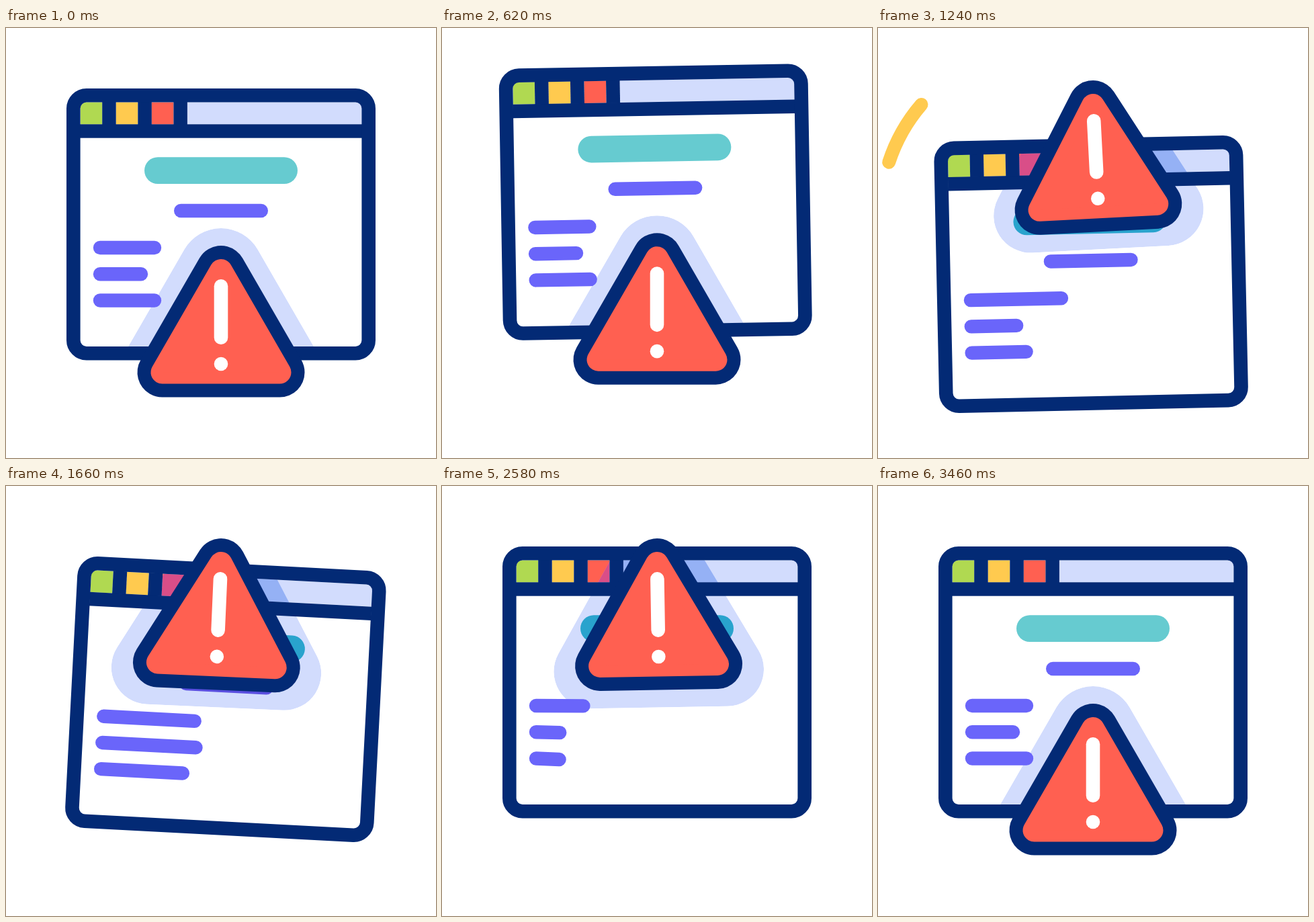
An HTML page with a canvas for the animation above (3.6 s loop, 640x640 px).

```html
<!DOCTYPE html>
<html lang="en">
<head>
<meta charset="utf-8">
<title>Warning window</title>
<style>
  html, body { margin: 0; width: 100%; height: 100%; overflow: hidden; background: #fff; }
  canvas { display: block; width: 640px; height: 640px; }
</style>
</head>
<body>
<canvas id="stage" width="640" height="640"></canvas>
<script>
const ctx = document.getElementById('stage').getContext('2d');
const LOOP = 3600, TAU = 2 * Math.PI;
const NAVY = '#032a75', PURPLE = '#6a65fa', YELLOW = '#ffca4f', RED = '#ff6051', MIST = '#d2dcfd';
const PLAIN = { lights: ['#b0d951', YELLOW, RED], address: MIST, title: '#66cbd0', subtitle: PURPLE };
const SHADED = { lights: ['#5fb36d', '#c9a76a', '#d94e88'], address: '#95b1f5', title: '#29a3cd', subtitle: '#5a4fe0' };

const rad = deg => deg * TAU / 360;

// Eased progress from 0 to 1 between two times.
function ease(t, start, end) {
  const u = Math.min(1, Math.max(0, (t - start) / (end - start)));
  return (1 - Math.cos(Math.PI * u)) / 2;
}

function roundRect(x, y, w, h, r) {
  const path = new Path2D();
  path.roundRect(x, y, w, h, r);
  return path;
}

const pill = (x, y, w, h) => roundRect(x, y, w, h, Math.min(w, h) / 2);

function fill(path, color) {
  ctx.fillStyle = color;
  ctx.fill(path);
}

function stroke(path, color, width) {
  ctx.strokeStyle = color;
  ctx.lineWidth = width;
  ctx.stroke(path);
}

const inner = roundRect(110.5, 110.5, 419, 363.7, 9);
const frame = roundRect(100.3, 100.3, 439.4, 384, 19.5);
const triangle = new Path2D('M320 361L232.5 512.5H407.5Z');
const halo = new Path2D();
halo.moveTo(320, 575.5);
halo.arcTo(123.4, 575.5, 320, 235, 55);
halo.arcTo(320, 235, 516.6, 575.5, 63);
halo.arcTo(516.6, 575.5, 320, 575.5, 55);
halo.closePath();

function pose(y, turn, pivotY) {
  ctx.setTransform(1, 0, 0, 1, 320, pivotY + y);
  ctx.rotate(rad(turn));
  ctx.translate(-320, -pivotY);
}

// The window is lifted, pressed down by the sign, then rocks back to rest.
function poseWindow(t) {
  const y = -33.5 * ease(t, 200, 650) + 109.5 * ease(t, 650, 1160) - 76 * ease(t, 1160, 1980);
  const turn = -1.55 * ease(t, 340, 820) + 4.55 * ease(t, 1160, 1640) - 3 * ease(t, 1640, 2160);
  pose(y, turn, 424);
}

// The sign crouches, jumps up, swings like a pendulum and drops back.
function poseSign(t) {
  const y = 30 * ease(t, 200, 480) - 276 * ease(t, 480, 990) + 246 * ease(t, 2900, 3460);
  const swing = ease(t, 980, 1180) * (1 - ease(t, 2760, 3240));
  pose(y, -3.4 * swing * Math.cos(TAU * (t - 1180) / 780), 361);
}

function drawRay(t) {
  const angle = progress => rad(256 - 58 * progress);
  const head = ease(t, 980, 1180), tail = ease(t, 1110, 1340);
  if (head - tail < 0.002) return;
  const ray = new Path2D();
  ray.arc(254, 277, 250, angle(head), angle(tail));
  stroke(ray, YELLOW, 20);
}

function drawContent(colors) {
  colors.lights.forEach((color, i) => fill(roundRect(110.5 + 53.1 * i, 110, 32.7, 33.4, 0), color));
  fill(roundRect(270, 110, 260, 33.4, 0), colors.address);
  fill(pill(206, 192.2, 228, 39.8), colors.title);
  fill(pill(250, 261.7, 140, 20.5), colors.subtitle);
}

function drawFrame() {
  ctx.fillStyle = NAVY;
  ctx.fillRect(110, 143.3, 420, 20.4);
  for (let i = 0; i < 3; i++) ctx.fillRect(143.2 + 53.1 * i, 110, 20.5, 34);
  stroke(frame, NAVY, 20.6);
}

// Each line grows, shrinks and recovers, a little later than the one above.
function drawLines(t) {
  for (let i = 0; i < 3; i++) {
    const rest = i === 1 ? 81 : 101, y = 327 + 39.25 * i, start = 900 + 240 * i;
    const width = rest + 79 * ease(t, start, start + 550)
      - (rest + 29) * ease(t, start + 550, start + 1290)
      + (rest - 50) * ease(t, start + 1290, start + 1850);
    const sag = Math.max(0, (rest - width) / 30);
    stroke(new Path2D(`M140 ${y}L${120 + width} ${y + sag}`), PURPLE, 20.4);
  }
}

function drawSign() {
  stroke(triangle, NAVY, 74);
  stroke(triangle, RED, 34);
  fill(triangle, RED);
  fill(pill(309.7, 374, 20.6, 97), '#fff');
  fill(pill(309.7, 489.7, 20.6, 20.6), '#fff');
}

function draw(t) {
  ctx.setTransform(1, 0, 0, 1, 0, 0);
  ctx.fillStyle = '#fff';
  ctx.fillRect(0, 0, 640, 640);
  ctx.lineCap = ctx.lineJoin = 'round';
  drawRay(t);

  poseWindow(t);
  fill(inner, '#fff');
  ctx.save();
  ctx.clip(inner);
  drawContent(PLAIN);
  poseSign(t);
  ctx.clip(halo);
  fill(halo, MIST);
  poseWindow(t);
  drawContent(SHADED);
  ctx.restore();

  poseWindow(t);
  drawFrame();
  drawLines(t);
  poseSign(t);
  drawSign();
}

function tick() {
  draw(performance.now() % LOOP);
  requestAnimationFrame(tick);
}
tick();
</script>
</body>
</html>
```
